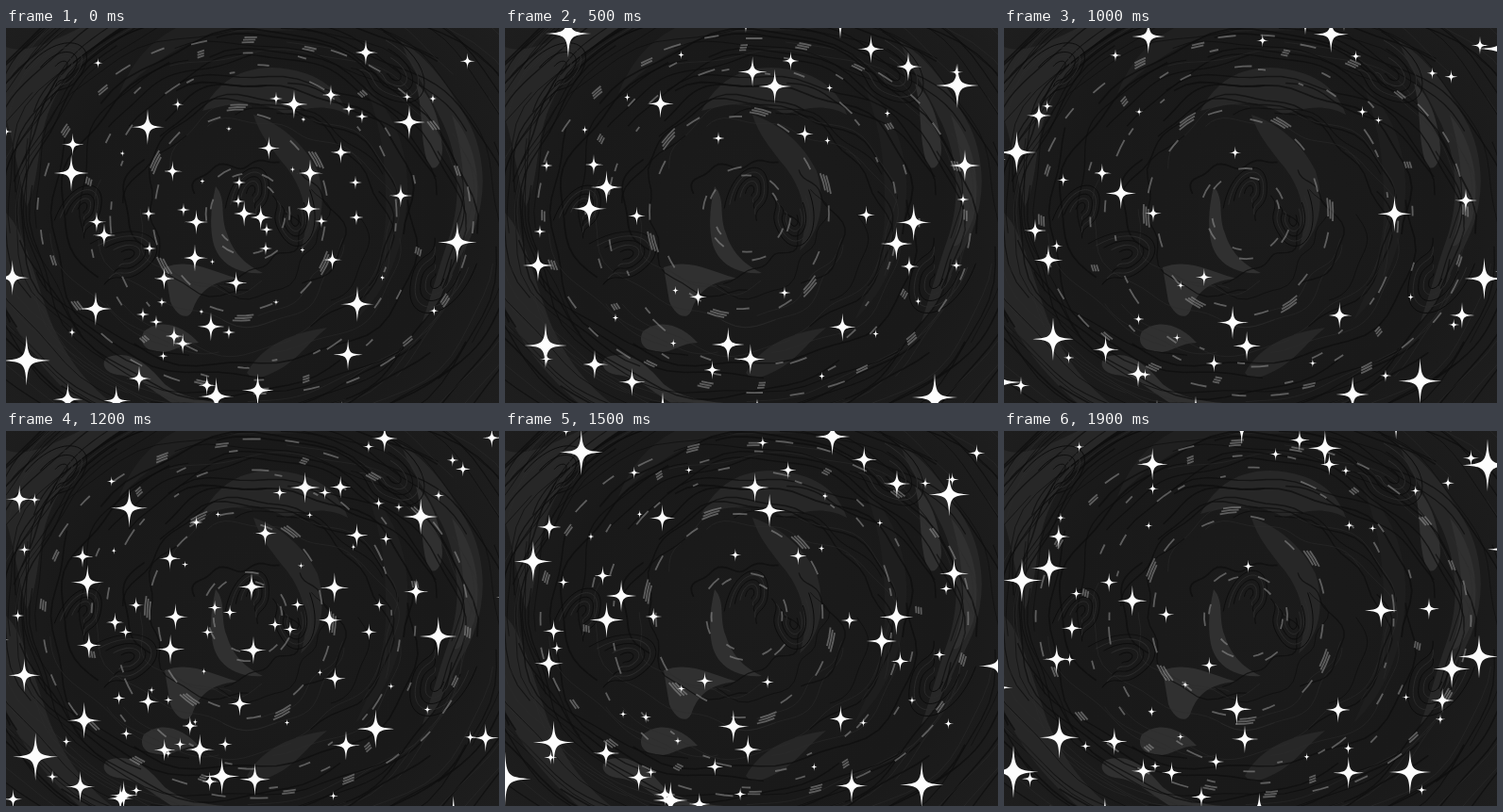
These frames come from a looping animation (522x398 px, 2000 ms). An HTML page:

```html
<!DOCTYPE html>
<html lang="en">
<head>
<meta charset="utf-8">
<title>Starfield</title>
<style>
  html, body { margin: 0; width: 100%; height: 100%; overflow: hidden; background: #1a1a1a; }
  svg { display: block; width: 100vw; height: 100vh; }
  path { vector-effect: none; }
</style>
</head>
<body>
<svg viewBox="0 0 522 398" preserveAspectRatio="none">
  <defs>
    <radialGradient id="shade" gradientUnits="userSpaceOnUse" cx="262" cy="200" r="330">
      <stop offset="0" stop-color="#1b1b1b"/>
      <stop offset=".6" stop-color="#191919"/>
      <stop offset="1" stop-color="#1e1e1e"/>
    </radialGradient>
  </defs>
  <rect width="522" height="398" fill="url(#shade)"/>
  <g fill="#272727">
    <path d="M208 88C222 60 246 42 282 42C326 44 352 62 362 92C340 80 318 84 296 92C270 74 238 80 208 88Z"/>
    <path d="M418 14C446 30 470 62 492 104C514 152 506 206 480 244C468 270 462 292 440 314C452 280 458 254 470 220C484 176 478 128 458 92C446 64 430 46 418 14Z"/>
    <path d="M0 20C20 28 46 16 78 0H120C88 20 58 54 44 92C32 128 36 160 22 190C14 160 8 120 0 96Z"/>
    <path d="M0 196C18 214 26 250 40 290C52 330 74 368 112 398H78C50 374 18 340 0 296Z"/>
    <path d="M255 366C272 336 302 324 340 318C318 336 306 356 282 366C270 372 262 374 255 366Z"/>
    <path d="M262 92C288 100 316 122 330 152C340 184 334 218 312 236C324 200 314 166 292 142C280 126 268 112 262 92Z"/>
    <path d="M380 60C414 90 430 140 424 190C420 238 402 280 370 310C392 266 404 226 402 180C402 132 394 96 380 60Z" fill="#1e1e1e"/>
    <path d="M120 70C150 40 180 20 215 8C240 0 290 6 330 0H180C146 18 130 44 120 70Z" fill="#202020"/>
  </g>
  <g fill="#303030">
    <path d="M222 168C234 182 226 198 234 218C240 238 254 252 272 260C246 262 224 250 219 226C215 204 218 186 222 168Z"/>
    <path d="M168 254C196 244 216 258 246 266C222 268 206 276 198 298C194 312 180 306 174 290Z"/>
    <path d="M146 322C166 306 190 318 204 334C186 334 176 346 160 344C148 342 140 334 146 322Z"/>
    <path d="M106 350C130 340 150 356 168 378C186 392 208 396 232 398H176C156 386 140 370 118 368C106 366 100 358 106 350Z"/>
    <path d="M434 58C450 72 460 96 462 128C462 146 452 156 446 142C438 116 442 88 434 58Z"/>
    <path d="M472 92C494 116 506 160 496 202C488 222 478 236 474 230C490 186 486 140 472 92Z"/>
  </g>
  <g id="veins" fill="none"></g>
  <g id="dashes" fill="none" stroke="#a2a2a2"></g>
  <path id="stars" fill="#fdfdfd"/>
</svg>
<script>
const W = 522, H = 398, STEP = 100, COUNT = 20;
const $ = id => document.getElementById(id);
const fix = n => n.toFixed(1);

function addPath(parent, attrs) {
  const p = document.createElementNS("http://www.w3.org/2000/svg", "path");
  for (const key in attrs) p.setAttribute(key, attrs[key]);
  return $(parent).appendChild(p);
}

function seeded(seed) {
  return () => {
    seed = (seed * 16807) % 2147483647;
    return seed / 2147483647;
  };
}
const rnd = seeded(4711);

// Marbled veins: wobbling spiral arcs around the middle
function vein(i) {
  const start = rnd() * 6.28, span = 0.7 + rnd() * 1.9, r0 = 22 + 260 * Math.sqrt(rnd());
  const drift = 8 + rnd() * 26, phase = rnd() * 6.28;
  let d = "";
  for (let n = 0; n <= 26; n++) {
    const a = start + span * n / 26;
    const r = r0 + drift * n / 26 + 7 * Math.sin(a * 4 + phase) + 3 * Math.sin(a * 11 + phase);
    d += (n ? "L" : "M") + fix(258 + r * 1.12 * Math.cos(a)) + " " + fix(198 + r * 0.96 * Math.sin(a));
  }
  const dark = i % 3 > 0;
  addPath("veins", {
    d, stroke: dark ? "#0e0e0e" : "#2d2d2d",
    "stroke-width": dark ? 0.8 + rnd() : 0.7, opacity: 0.75
  });
}
for (let i = 0; i < 110; i++) vein(i);

// Small curls made of nested loops
function curl(x, y, size, tilt) {
  for (let n = 1; n <= 5; n++) {
    const r = size * n / 5;
    addPath("veins", {
      d: `M${-r} ${r}C${-r} ${-r} ${r * 0.4} ${-r * 1.6} ${r * 0.7} ${-r * 0.4}S${r * 0.2} ${r * 0.6} ${r * 0.5} ${r * 1.3}`,
      transform: `translate(${x} ${y}) rotate(${tilt})`,
      stroke: n % 2 ? "#0d0d0d" : "#2b2b2b", "stroke-width": 0.9
    });
  }
}
curl(260, 172, 24, 10);
curl(306, 205, 26, 160);
curl(82, 190, 24, 20);
curl(130, 240, 30, 60);
curl(412, 50, 34, 120);
curl(455, 270, 34, 200);
curl(60, 40, 28, 40);

// Dashed rings: cx, cy, rx, ry, dashes per sixth of a turn
const rings = [
  [256, 197, 44, 45, 2],
  [248, 196, 92, 104, 3],
  [262, 200, 152, 158, 4],
  [262, 200, 172, 174, 3],
  [264, 199, 228, 189, 5]
].map(([cx, cy, rx, ry, n]) => ({
  cx, cy, rx, ry,
  marks: Array.from({ length: n }, (_, i) => ({
    a: (i + 0.7 * rnd()) / n * Math.PI / 3,
    len: 5 + rnd() * 14,
    off: (rnd() - 0.5) * 12,
    strands: 1 + Math.floor(rnd() * 2.6)
  })),
  path: addPath("dashes", { "stroke-width": 1.8, opacity: 0.5 })
}));

function ringPath(ring, turn) {
  let d = "";
  for (let s = 0; s < 6; s++) {
    for (const m of ring.marks) {
      const a = m.a + s * Math.PI / 3 + turn;
      for (let j = 0; j < m.strands; j++) {
        const grow = m.off + j * 2.6 + 4 * Math.sin(2 * a);
        const span = m.len / ring.rx;
        for (let n = 0; n < 3; n++) {
          const b = a + span * (n / 2 + 0.12 * j);
          d += (n ? "L" : "M") + fix(ring.cx + (ring.rx + grow) * Math.cos(b)) +
            " " + fix(ring.cy + (ring.ry + grow) * Math.sin(b));
        }
      }
    }
  }
  return d;
}

// Stars: x, y, speed x, speed y per step, radius
const growing = [
  [322, 154, 22.15, 10.45, 14], [372, 293, 16.6, 19.8, 18], [95, 298, -10.4, 7.8, 17],
  [305, 81, 10, -18, 14.5], [243.7, 270.5, 3.25, 16.2, 11.5], [269.8, 201, -6.7, 27, 13],
  [201.5, 206, -18.8, -7.4, 12.5], [345.6, 246, 2.35, 14.3, 10.5], [208, 162.5, -15.7, -17.8, 3.6],
  [236, 323, -3.3, 8, 7], [247, 164, -8.5, 24.3, 7], [246, 184, -21.3, 3.1, 7],
  [207, 301, -5.75, 6.7, 3.6], [178, 327, -8.7, 9.75, 10.5], [167.5, 266, -14.5, 18.2, 11],
  [381, 26, 17, -15.5, 13], [452, 75, 5.2, -5.65, 5.5], [356.5, 133, 9.7, -8.5, 3.6],
  [398.7, 265, 7.75, 5, 3.6], [151, 197, -11.4, -10.4, 7.8], [218.5, 248, -7.6, 6.1, 3.6],
  [104, 220, -13.8, 6.4, 12], [286, 291, 9.9, 15.7, 3.5]
];
const drifting = [[334, 205], [152, 234], [145, 304], [363, 86]]
  .map(([x, y]) => [x, y, -21.6, -17.6, 7]);

// Ages of the waves at the loop start; some also have a half-turned copy
const waves = [
  { age: 7.04 }, { age: 0, twin: true }, { age: -5.87 },
  { age: -10.83, twin: true }, { age: -15.51 }
];
const BORN = -0.4, GONE = 12;

function starPath(x, y, r) {
  if (x < -40 || x > W + 40 || y < -40 || y > H + 40) return "";
  const t = r * 1.06;
  const p = (a, b) => fix(x + a * r) + " " + fix(y + b * t);
  const arm = (ax, ay, bx, by) =>
    `C${p(ax * 0.1 + bx * 0.06, ay * 0.1 + by * 0.06)} ${p(ax * 0.06 + bx * 0.1, ay * 0.06 + by * 0.1)} ${p(bx, by)}`;
  return "M" + p(0, -1) + arm(0, -1, 1, 0) + arm(1, 0, 0, 1) + arm(0, 1, -1, 0) + arm(-1, 0, 0, -1) + "Z";
}

function wavePath(age, twin) {
  let d = "";
  const put = ([x0, y0, vx, vy, r0], rate) => {
    const x = x0 + vx * age, y = y0 + vy * age, r = r0 * (1 + rate * age);
    d += starPath(x, y, r);
    if (twin) d += starPath(W - x, H - y, r);
  };
  growing.forEach(s => put(s, 0.068));
  drifting.forEach(s => put(s, -0.01));
  return d;
}

function draw(step) {
  let d = "";
  for (const w of waves) {
    const age = step + w.age;
    if (age >= BORN && age <= GONE) d += wavePath(age, w.twin);
  }
  $("stars").setAttribute("d", d);
  const turn = step / COUNT * Math.PI / 3;
  for (const ring of rings) ring.path.setAttribute("d", ringPath(ring, turn));
}

const begin = performance.now();
let shown = -1;
function tick() {
  const step = Math.floor((performance.now() - begin) / STEP) % COUNT;
  if (step !== shown) draw(shown = step);
  requestAnimationFrame(tick);
}
tick();
</script>
</body>
</html>
```
